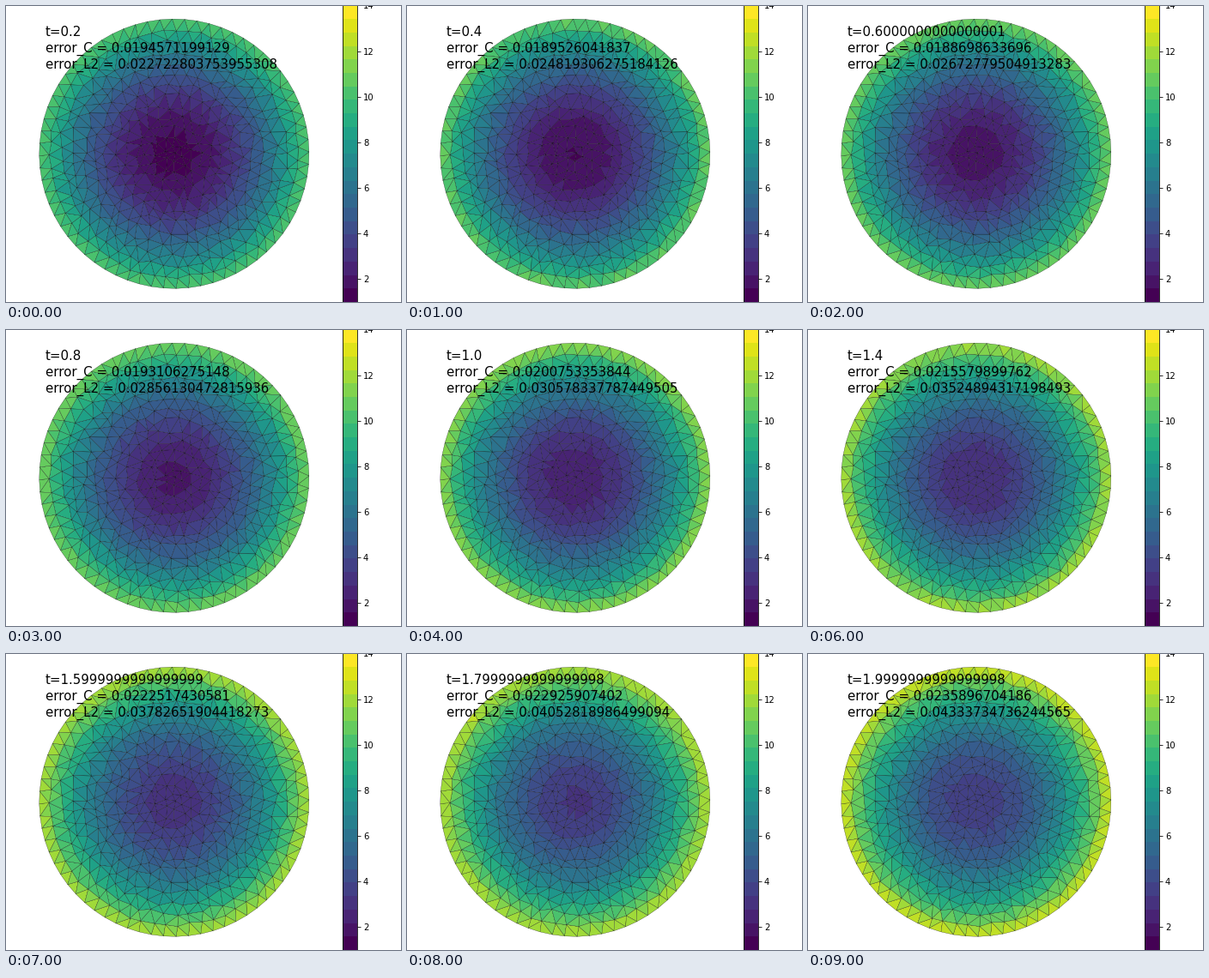
A matplotlib script that plays this animation: 460x345 px, repeating every 10 s.

```python
import numpy as np
import matplotlib.pyplot as plt
from matplotlib.animation import FuncAnimation
from matplotlib.tri import Triangulation

W, H, DPI = 460, 345, 80
PX = 72 / DPI                      # points per pixel
FULL_W, FULL_H = 460.8, 345.6      # layout size, cropped by the stage
VMIN, VMAX, BANDS = 1.0, 14.0, 22
RINGS = 13
STEPS = 10

ERR_C = ["0.0194571199129", "0.0189526041837", "0.0188698633696",
         "0.0193106275148", "0.0200753353844", "0.0208386419934",
         "0.0215579899762", "0.0222517430581", "0.022925907402",
         "0.0235896704186"]
ERR_L2 = ["0.022722803753955308", "0.024819306275184126",
          "0.02672779504913283", "0.02856130472815936",
          "0.030578337787449505", "0.03282404437324502",
          "0.03524894317198493", "0.03782651904418273",
          "0.04052818986499094", "0.04333734736244565"]

plt.rcParams["font.family"] = "DejaVu Sans"


def disc_mesh():
    """Irregular triangulation of the unit disc, finer at the centre."""
    rng = np.random.default_rng(7)
    radii = (np.arange(RINGS + 1) / RINGS) ** 1.1
    xs, ys = [0.01], [0.006]
    for k in range(1, RINGS + 1):
        r, gap = radii[k], radii[k] - radii[k - 1]
        n = round(2 * np.pi * r / (1.1 * gap))
        ang = 2 * np.pi * (np.arange(n) + rng.random()) / n
        spread = 0 if k == RINGS else (0.09 if k == RINGS - 1 else 0.18)
        dx, dy = gap * np.clip(rng.normal(0, spread, (2, n)), -0.3, 0.3)
        xs.extend(r * np.cos(ang) + dx)
        ys.extend(r * np.sin(ang) + dy)
    return Triangulation(np.array(xs), np.array(ys))


def pixel_axes(x, w):
    """Axes over the full layout height, x and width in pixels."""
    return fig.add_axes([x / W, 0, w / W, FULL_H / H])


mesh = disc_mesh()
rho2 = (mesh.x[mesh.triangles].mean(axis=1) ** 2
        + mesh.y[mesh.triangles].mean(axis=1) ** 2)
times = np.cumsum([0.2] * STEPS)


def field(t):
    return 1.1 + 1.2 * t + 9.4 * rho2


fig = plt.figure(figsize=(W / DPI, H / DPI), dpi=DPI, facecolor="white")
cmap = plt.get_cmap("viridis", BANDS)

ax = pixel_axes(0.8 * FULL_W - FULL_H, FULL_H)
ax.axis("off")
disc = ax.tripcolor(mesh, facecolors=field(times[0]), cmap=cmap,
                    vmin=VMIN, vmax=VMAX, edgecolors="k",
                    linewidth=0.25 * PX, antialiased=True)
ax.set(xlim=(-1.1, 1.1), ylim=(-1.1, 1.1))

bar = pixel_axes(0.85 * FULL_W, FULL_H / 20)
edges = np.linspace(VMIN, VMAX, BANDS + 1)
bar.pcolormesh([0, 1], edges, np.arange(BANDS)[:, None], cmap=cmap)
bar.set(xlim=(0, 1), ylim=(VMIN, VMAX), xticks=[], yticks=range(2, 15, 2))
bar.yaxis.tick_right()
bar.tick_params(axis="y", length=3.5 * PX, width=0.8 * PX, pad=3.5 * PX,
                labelsize=10 * PX)
for spine in bar.spines.values():
    spine.set_linewidth(0.8 * PX)

lines = [fig.text(46 / W, 1 - y / H, "", fontsize=15 * PX, va="baseline")
         for y in (35.3, 53.5, 72.3)]


def draw(i):
    disc.set_array(field(times[i]))
    lines[0].set_text(f"t={float(times[i])}")
    lines[1].set_text(f"error_C = {ERR_C[i]}")
    lines[2].set_text(f"error_L2 = {ERR_L2[i]}")
    return [disc, *lines]


anim = FuncAnimation(fig, draw, frames=STEPS, interval=1000,
                     repeat=True, repeat_delay=0, blit=False)
plt.show()
```
